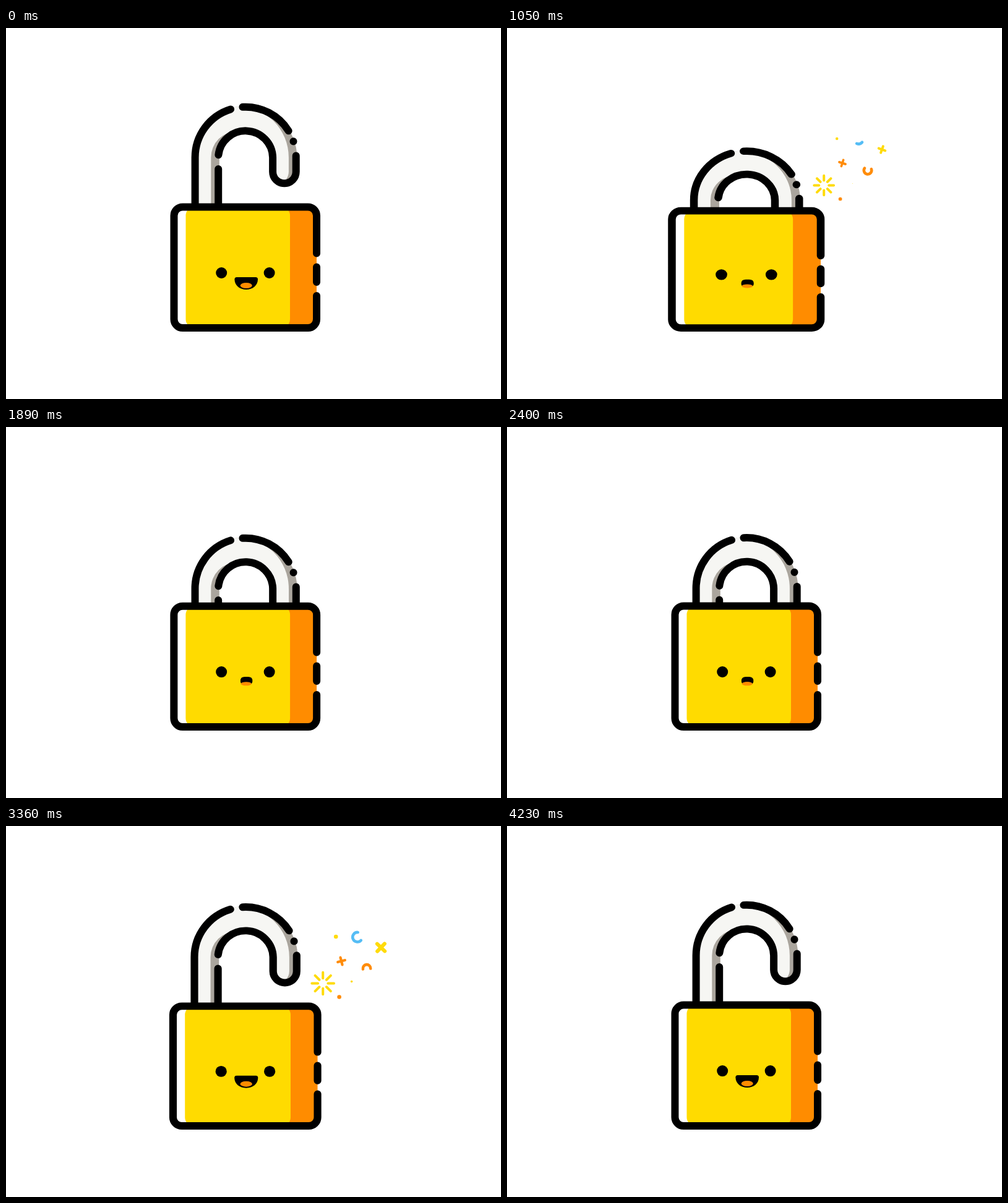
An HTML page for the animation above (4260 ms loop, 800 px wide and 600 px high).

```html
<!DOCTYPE html>
<html lang="en">
<head>
<meta charset="utf-8">
<title>Padlock</title>
<style>
  html, body { margin: 0; width: 100%; height: 100%; overflow: hidden; background: #fff; }
  svg { display: block; width: 100vw; height: 100vh; }
  .ink { fill: none; stroke: #000; stroke-width: 12; stroke-linecap: round; stroke-linejoin: round; }
  .bit { fill: none; stroke-linecap: round; }
</style>
</head>
<body>
<svg viewBox="0 0 800 600">
  <defs>
    <path id="steel" d="M304 420V209.4A83.2 83.2 0 0 1 470.4 209.4V232.4A20.3 20.3 0 0 1 429.8 232.4V209.4A42.5 42.5 0 0 0 344.8 209.4V420Z"/>
    <clipPath id="inside"><use href="#steel"/></clipPath>
  </defs>
  <g id="lock">
    <g id="shackle">
      <use href="#steel" fill="#aaa59d"/>
      <g clip-path="url(#inside)"><use href="#steel" x="-13.5" fill="#f6f6f3"/></g>
      <path class="ink" d="M305.6 420V209.4A81.7 81.7 0 0 1 363 131.4
        M382.5 127.8A81.7 81.7 0 0 1 456.6 166.3
        M464.5 183.3v.3
        M468.7 206.5V232.4A18.8 18.8 0 0 1 431.1 232.4V209.4A44 44 0 0 0 343.4 205.3
        M343.2 228V420"/>
    </g>
    <rect x="271.5" y="289.5" width="230" height="195.5" rx="14" fill="#fff"/>
    <path d="M400 289.5H488A14 14 0 0 1 502 303.5V471A14 14 0 0 1 488 485H400Z" fill="#ff8c00"/>
    <rect x="290.5" y="289.5" width="168.5" height="195.5" rx="14" fill="#ffdb00"/>
    <path class="ink" d="M502 364.5V303.5A14 14 0 0 0 488 289.5H285.5A14 14 0 0 0 271.5 303.5V471A14 14 0 0 0 285.5 485H488A14 14 0 0 0 502 471V433M502 386.5V411"/>
    <circle cx="348.2" cy="396" r="9"/>
    <circle cx="425.6" cy="396" r="9"/>
    <path id="mouth"/>
    <ellipse id="tongue" cx="388.2" fill="#ff8c00"/>
  </g>
  <g id="sparks"></g>
</svg>
<script>
const LOOP = 4260, HALF = LOOP / 2;
const LOCKED = 51.5, SLIDE = 250, IMPACT = 900, LANDING = 3190;
const YELLOW = '#ffdb0a', ORANGE = '#ff8c0a', BLUE = '#55bdf5';

const $ = id => document.getElementById(id);
const set = (el, attrs) => { for (const k in attrs) el.setAttribute(k, attrs[k]); };
const mix = (a, b, u) => a + (b - a) * u;
const ramp = (t, from, to) => Math.min(1, Math.max(0, (t - from) / (to - from)));
const ease = (t, from, to) => { const u = ramp(t, from, to); return u * u * (3 - 2 * u); };
const arch = (t, from, to) => Math.sin(Math.PI * ramp(t, from, to));
const wobble = (t, size) => t < 0 ? 0 : size * Math.exp(-t / 215) * Math.sin(2 * Math.PI * t / 440);

// The shackle falls or rises with constant acceleration, then rebounds.
function drop(t) {
  if (t < HALF) return LOCKED * ramp(t, SLIDE, IMPACT) ** 2 + 250 * wobble(t - IMPACT, .105);
  return LOCKED * (1 - ramp(t, SLIDE + HALF, IMPACT + HALF) ** 2) - 33 * arch(t, IMPACT + HALF, LANDING);
}

const HAPPY = { mid: 388.2, half: 18.8, top: 403, rim: 406.5, corner: 3.5, base: 423, jaw: 10, tongueY: 416.5, rx: 9.5, ry: 4.5 };
const SAD = { mid: 388.6, half: 9.7, top: 404, rim: 410.5, corner: 7, base: 415.5, jaw: 6.5, tongueY: 415.2, rx: 8.4, ry: 3.1 };

function drawMouth(u) {
  const m = {};
  for (const k in HAPPY) m[k] = mix(HAPPY[k], SAD[k], u);
  const left = m.mid - m.half, right = m.mid + m.half, low = m.rim + m.jaw, bend = m.half * .55;
  set($('mouth'), {
    d: `M${left} ${m.rim}Q${left} ${m.top} ${left + m.corner} ${m.top}H${right - m.corner}
      Q${right} ${m.top} ${right} ${m.rim}C${right} ${low} ${m.mid + bend} ${m.base} ${m.mid} ${m.base}
      C${m.mid - bend} ${m.base} ${left} ${low} ${left} ${m.rim}Z`
  });
  set($('tongue'), { cy: m.tongueY, rx: m.rx, ry: m.ry });
}

function drawLock(t) {
  const squash = wobble(t - (t < HALF ? IMPACT : LANDING), t < HALF ? .105 : .046);
  set($('shackle'), { transform: `translate(0 ${drop(t)})` });
  set($('lock'), {
    transform: `translate(387 490.5) scale(${1 + squash} ${1 - .7 * squash}) translate(-387 -490.5)`
  });
  drawMouth(ease(t, 660, 920) - ease(t, 2785, 3045));
}

// Point on a circle, degrees clockwise from the top.
const polar = (x, y, r, deg) => {
  const a = deg * Math.PI / 180;
  return `${x + r * Math.sin(a)} ${y - r * Math.cos(a)}`;
};
const sparks = [];
function spark(color, draw) {
  const el = document.createElementNS('http://www.w3.org/2000/svg', 'path');
  set(el, { class: 'bit', stroke: color });
  $('sparks').append(el);
  sparks.push({ el, draw });
}

function burst(x, y) {
  spark(YELLOW, t => {
    const inner = 8 + 11.5 * ease(t, 520, 1000);
    const outer = 8.01 + 11.5 * (1 - (1 - ramp(t, 0, 900)) ** 2);
    let d = '';
    for (let a = 0; a < 360; a += 45) d += `M${polar(x, y, inner, a)}L${polar(x, y, outer, a)}`;
    return { d, 'stroke-width': 4 * (1 - ramp(t, 810, 1000)) };
  });
}

// An arc whose head runs ahead from one angle to another and whose tail follows.
function curl(color, x, y, r, angles, head, tail, fade) {
  spark(color, t => {
    const a = mix(...angles, ease(t, ...tail));
    const b = Math.max(mix(...angles, ease(t, ...head)), a + .1);
    return {
      d: `M${polar(x, y, r, a)}A${r} ${r} 0 ${+(b - a > 180)} 1 ${polar(x, y, r, b)}`,
      'stroke-width': 4.6,
      opacity: t < head[0] ? 0 : 1 - ramp(t, fade, fade + 100)
    };
  });
}

function star(color, x, y, size, angle, spin, from, to) {
  spark(color, t => {
    const s = size * arch(t, from, to), w = s * .52, turn = angle + (t - from) * spin;
    const arm = a => `M${polar(x, y, s - w / 2, a)}L${polar(x, y, s - w / 2, a + 180)}`;
    return { d: arm(turn) + arm(turn + 90), 'stroke-width': w };
  });
}

function dot(color, x, y, r, from, to) {
  spark(color, t => ({ d: `M${x} ${y}h.01`, 'stroke-width': 2 * r * arch(t, from, to) }));
}

burst(512.2, 254.5);
curl(ORANGE, 583, 230.3, 6.2, [0, 490], [0, 670], [250, 840], 770);
curl(BLUE, 568, 179.7, 7.8, [130, 505], [240, 780], [540, 860], 820);
star(YELLOW, 606, 196.5, 12, -8, .145, 200, 1080);
star(ORANGE, 542, 218.5, 8.2, -77, .35, 120, 930);
dot(YELLOW, 533.2, 179, 3.4, 200, 1030);
dot(YELLOW, 558.6, 251.5, 2.2, 360, 1020);
dot(ORANGE, 538.6, 276.5, 3.3, 120, 930);

function drawSparks(t) {
  const age = t < 2400 ? t - 660 : t - 2805;
  set($('sparks'), { opacity: age > 1100 ? 0 : ramp(age, 0, 30) });
  for (const { el, draw } of sparks) set(el, draw(age));
}

const start = performance.now();
function frame() {
  const t = (performance.now() - start) % LOOP;
  drawLock(t);
  drawSparks(t);
  requestAnimationFrame(frame);
}
frame();
</script>
</body>
</html>
```
